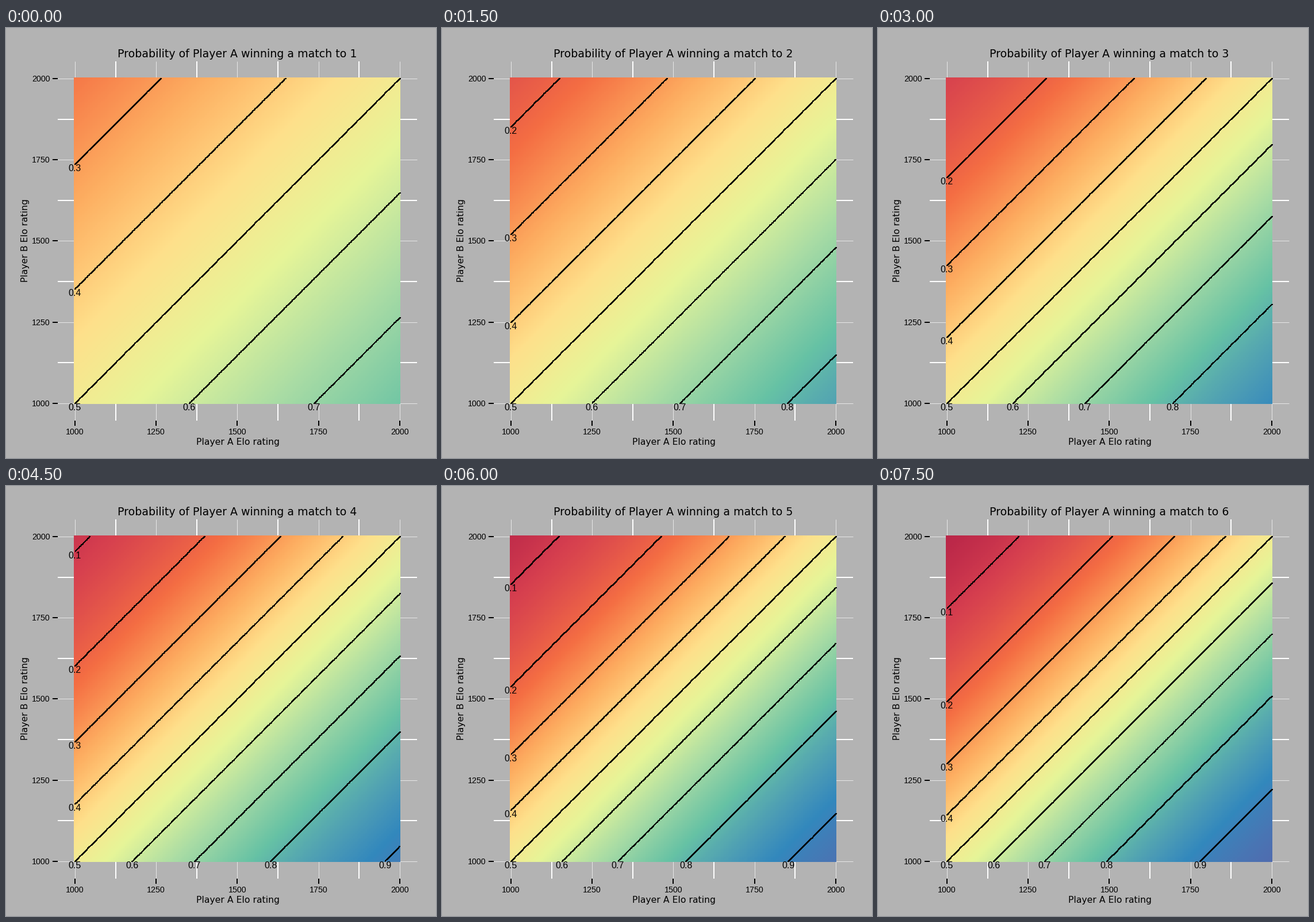
A matplotlib script for the animation above (8 s loop, 748 by 748 pixels).

```python
import math

import matplotlib.pyplot as plt
import numpy as np
from matplotlib.animation import FuncAnimation
from matplotlib.colors import ListedColormap, to_rgb

SIZE, DPI = 748, 100
LEFT, BOTTOM, SPAN = 119.9, 652.9, 565  # pixel position of rating 1000, and of 1000 points
PANEL = (90, 715, 58, 683)              # left, right, top, bottom
RASTER = (118, 686, 654, 86)
ELO = np.arange(1000, 2001, 5)
SPECTRAL = ["#9E0142", "#D53E4F", "#F46D43", "#FDAE61", "#FEE08B",
            "#E6F598", "#ABDDA4", "#66C2A5", "#3288BD", "#5E4FA2"]
XYZ = np.array([[.4124564, .3575761, .1804375],
                [.2126729, .7151522, .0721750],
                [.0193339, .1191920, .9503041]])
WHITE = XYZ.sum(axis=1)


def rgb_to_lab(rgb):
    lin = np.where(rgb > .04045, ((rgb + .055) / 1.055) ** 2.4, rgb / 12.92)
    t = lin @ XYZ.T / WHITE
    f = np.where(t > .008856, np.cbrt(t), 7.787 * t + 16 / 116)
    x, y, z = f.T
    return np.column_stack([116 * y - 16, 500 * (x - y), 200 * (y - z)])


def lab_to_rgb(lab):
    y = (lab[:, 0] + 16) / 116
    f = np.column_stack([y + lab[:, 1] / 500, y, y - lab[:, 2] / 200])
    t = np.where(f > .2069, f ** 3, (f - 16 / 116) / 7.787)
    lin = np.clip(t * WHITE @ np.linalg.inv(XYZ).T, 0, 1)
    return np.where(lin > .0031308, 1.055 * lin ** (1 / 2.4) - .055, 12.92 * lin)


def lab_gradient(names, count=1024):
    lab = rgb_to_lab(np.array([to_rgb(c) for c in names]))
    at = np.linspace(0, len(names) - 1, count)
    mixed = [np.interp(at, range(len(names)), channel) for channel in lab.T]
    return ListedColormap(np.clip(lab_to_rgb(np.column_stack(mixed)), 0, 1))


def px(elo):
    return LEFT + (elo - 1000) * SPAN / 1000


def py(elo):
    return BOTTOM - (elo - 1000) * SPAN / 1000


def pt(pixels):
    return pixels * 72 / DPI


def write(x, y, s, size, font="Liberation Sans", **kw):
    kw = {"ha": "center", "va": "baseline", "zorder": 6, **kw}
    return ax.text(x, y, s, fontsize=pt(size), family=font, color="black", **kw)


def rule(xs, ys, color, width):
    ax.plot(xs, ys, color=color, lw=pt(width), solid_capstyle="butt",
            snap=True, zorder=1)


fig = plt.figure(figsize=(SIZE / DPI, SIZE / DPI), dpi=DPI, facecolor="#B3B3B3")
ax = fig.add_axes([0, 0, 1, 1])
ax.axis("off")

left, right, top, bottom = PANEL
for elo in range(1125, 2000, 250):
    x, y = px(elo), py(elo)
    rule([x, x], [top, bottom], "white", 2)
    rule([left, right], [y, y], "white", 2)
for elo in range(1000, 2001, 250):
    x, y = px(elo), py(elo)
    rule([x, x], [top, bottom], "#E6E6E6", 1)
    rule([left, right], [y, y], "#E6E6E6", 1)
    rule([x, x], [bottom, bottom + 9], "black", 2)
    rule([left - 9, left], [y, y], "black", 2)
    write(x, 707, str(elo), 14.3)
    write(76.5, y + 5, str(elo), 14.3, ha="right")

write(403, 725, "Player A Elo rating", 15.6, "DejaVu Sans")
write(41, 370, "Player B Elo rating", 15.6, "DejaVu Sans",
      rotation=90, ha="right", va="center")
title = write(402.5, 51, "", 19, "DejaVu Sans")

gap = ELO[None, :] - ELO[::-1, None]
image = ax.imshow(np.zeros(gap.shape), cmap=lab_gradient(SPECTRAL), vmin=0, vmax=1,
                  extent=RASTER, interpolation="nearest", aspect="auto", zorder=2)
ax.set_xlim(0, SIZE)
ax.set_ylim(SIZE, 0)

LEVELS = [k / 10 for k in range(1, 10)]
contours = [ax.plot([], [], color="black", lw=pt(1), antialiased=False,
                    snap=False, zorder=4)[0] for _ in LEVELS]
labels = [write(0, 0, f"{p:.1f}", 16) for p in LEVELS]


def contour_points(d):
    """Whole-pixel points where the line A - B = d crosses the rating grid."""
    a = np.union1d(ELO, ELO + d)
    a = a[(a >= max(1000, 1000 + d)) & (a <= min(2000, 2000 + d))]
    # The half-pixel shift on one axis makes the hard-edged line two pixels wide.
    return np.round(px(a)) + .5, np.round(py(a - d))


def draw(i):
    length = i // 3 + 1
    scale = math.sqrt(length) / 2000
    title.set_text(f"Probability of Player A winning a match to {length}")
    image.set_data(1 / (1 + 10 ** (-gap * scale)))
    for p, line, label in zip(LEVELS, contours, labels):
        d = math.log10(p / (1 - p)) / scale
        shown = abs(d) < 1000
        line.set_visible(shown)
        label.set_visible(shown)
        if shown:
            line.set_data(*contour_points(d))
            label.set_position((px(1000 + max(d, 0)), py(1000 + max(-d, 0)) + 12))
    return [title, image, *contours, *labels]


anim = FuncAnimation(fig, draw, frames=16, interval=500, repeat=True,
                     repeat_delay=0, blit=False)
plt.show()
```
